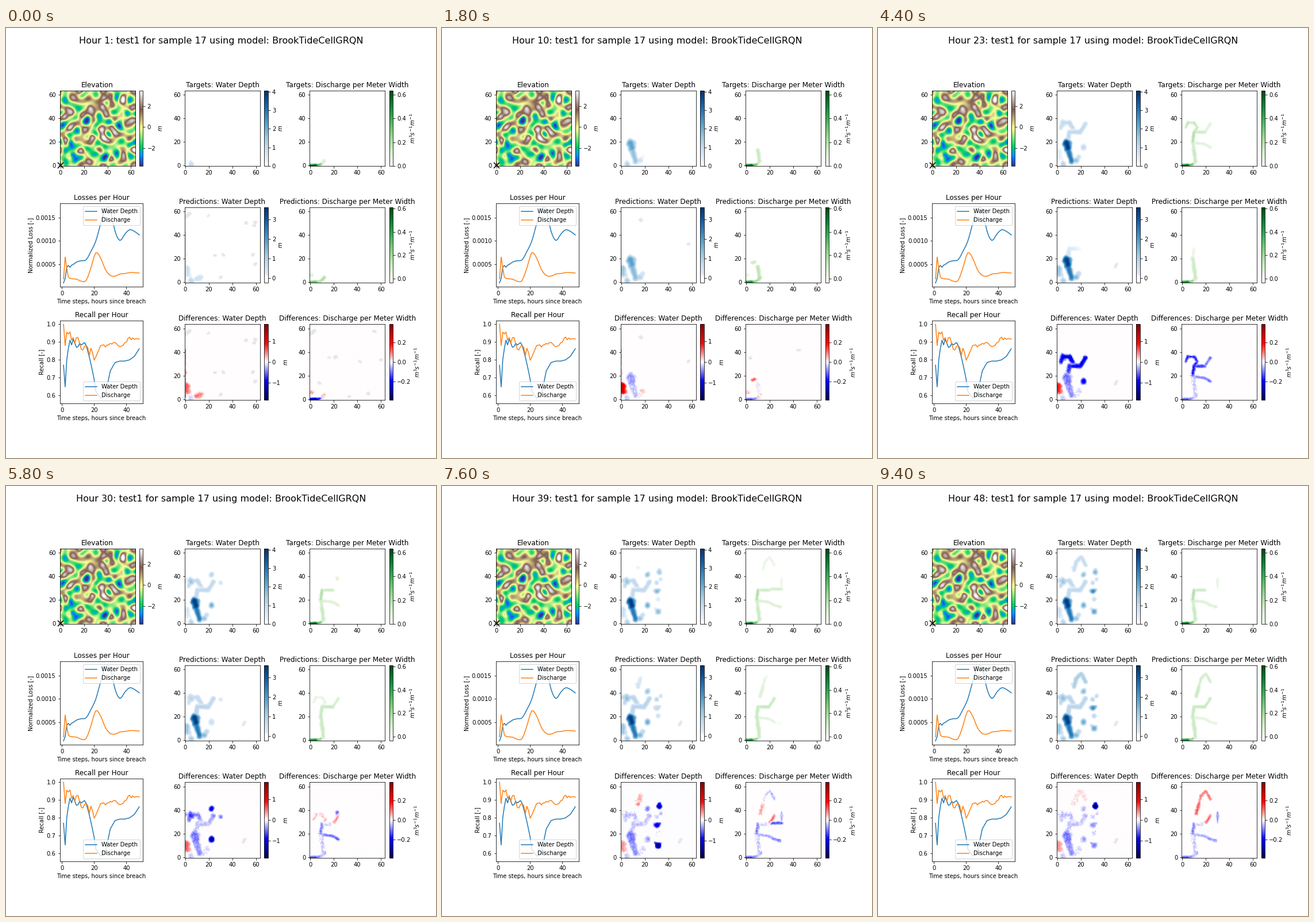
Write a matplotlib script that moves like this. It is 748 by 748 pixels and loops after 9600 ms.

```python
import numpy as np
import matplotlib.pyplot as plt
from matplotlib.animation import FuncAnimation
from matplotlib.colors import LinearSegmentedColormap, ListedColormap
from mpl_toolkits.axes_grid1 import make_axes_locatable

N, HOURS = 64, 48
DISCHARGE = "$m^3 s^{-1} m^{-1}$"
yy, xx = np.mgrid[0:N, 0:N].astype(float)

# Watercourses
LAKE = [(8, 19), (9, 15), (10, 9), (12, 4)]
STREAM = [(9, 20), (10, 28), (19, 28), (24, 35)]
ARC = [(13, 32), (10, 36), (5, 36), (3, 32)]
NORTH = [(14, 45), (16, 52), (20, 56), (24, 49)]
COLUMN = [(11, 3), (10, 13), (9, 20)]

# Pools: x, y, radius, depth, first hour, lag of the prediction
POOLS = [
    (18, 7, 2.8, 1.0, 9, -3), (5, 1, 3.0, 1.3, -6, 0), (5, 35, 3.6, 1.6, 20, 5),
    (1, 36, 2.6, 1.0, 26, 3), (22, 15, 3.2, 2.1, 19, 9), (22, 41, 2.8, 1.8, 24, 7),
    (30, 34, 2.2, 1.1, 24, 4), (33, 37, 2.0, 0.9, 31, 2), (30, 27, 3.2, 2.8, 33, 4),
    (31, 20, 2.2, 1.0, 35, -1), (31, 10, 3.3, 2.3, 32, 7), (32, 43, 2.9, 2.0, 32, 20),
    (14, 47, 2.4, 0.9, 37, -3),
]
HOLLOWS = [(3, 56), (42, 37), (51, 31), (47, 56), (58, 17), (48, 12), (40, 8), (56, 45)]
HILLS = [(36, 29), (37, 25), (24, 3), (4, 22), (17, 13), (9, 44), (3, 42), (27, 24),
         (25, 49), (37, 57), (36, 50), (54, 54), (59, 38), (45, 27), (53, 9), (16, 62)]


def smooth_noise(seed, k0, spread):
    """Band-limited random field with unit deviation."""
    freq = np.fft.fftfreq(N) * N
    k = np.hypot(freq[:, None], freq[None, :])
    white = np.random.default_rng(seed).normal(size=(N, N))
    field = np.fft.ifft2(np.fft.fft2(white) * np.exp(-((k - k0) / spread) ** 2)).real
    return field / field.std()


def terrain():
    """Random relief bent to pass through the known hills and hollows."""
    groups = [(LAKE, -3.0), ([p[:2] for p in POOLS], -2.0), (HOLLOWS, -2.6), (HILLS, 2.8)]
    px, py = np.vstack([pts for pts, _ in groups]).T
    height = np.concatenate([[z] * len(pts) for pts, z in groups])
    base = 1.25 * smooth_noise(17, 5.8, 2.2)

    def kernel(x, y):
        return np.exp(-((x[..., None] - px) ** 2 + (y[..., None] - py) ** 2) / 9)

    gap = height - base[py.astype(int), px.astype(int)]
    weights = np.linalg.solve(kernel(px, py) + 0.03 * np.eye(len(gap)), gap)
    return np.clip(base + kernel(xx, yy) @ weights, -3.73, 3.48)


WOBBLE = smooth_noise(3, 9, 4)
ROUGH = np.random.default_rng(8).normal(size=(N, N))


def stroke(pts, width):
    """Soft profile around a path, and how far along the path each cell lies."""
    pts = np.array(pts, float)
    if len(pts) == 1:
        pts = np.vstack([pts, pts])
    best = np.full((N, N), 99.0)
    along = np.zeros((N, N))
    for i, ((x0, y0), (x1, y1)) in enumerate(zip(pts[:-1], pts[1:])):
        dx, dy = x1 - x0, y1 - y0
        t = np.clip(((xx - x0) * dx + (yy - y0) * dy) / (dx * dx + dy * dy + 1e-9), 0, 1)
        dist = np.hypot(xx - x0 - t * dx, yy - y0 - t * dy)
        along = np.where(dist < best, (i + t) / (len(pts) - 1), along)
        best = np.minimum(best, dist)
    return np.clip(1 - (best * (1 + 0.12 * WOBBLE) / width) ** 2, 0, 1), along


def level(h, along, amount, start, ramp=5, front=0, end=99):
    """Rise from the start hour, delayed along the path, and fade after the end."""
    up = np.clip((h - start - front * along) / ramp, 0, 1) ** 0.7
    return amount * up * np.clip((end + 5 - h) / 5, 0, 1)


depth_bodies, flow_bodies = [], []


def depth(path, width, target=None, pred=None):
    depth_bodies.append((*stroke(path, width), target, pred))


def flow(path, width, target=None, pred=None):
    flow_bodies.append((*stroke(path, width), target, pred))


for x, y, radius, amount, start, lag in POOLS:
    depth([(x, y)], radius, (amount, start, 10), (0.85 * amount, start + lag, 10))
depth(LAKE[:2], 4.2, (4.0, 1, 20), (3.5, 1, 21))
depth(LAKE[1:], 3.3, (3.0, 1, 21), (2.6, 1, 21))
depth([(12, 4), (16, 4)], 2.8, (1.6, 4, 16), (1.5, 3, 15))
depth([(1, 12), (1, 7)], 3.2, (0.9, 13, 25), (1.3, -3, 12))
depth([(9, 3), (13, 4)], 2.6, None, (0.5, -9, 5, 0, 5))
depth([(0, 2), (0, 42)], 1.0, None, (0.45, -9, 5, 0, 7))
depth(STREAM, 2.3, (1.1, 12, 5, 7), (0.9, 20, 8, 4))
depth(ARC, 2.4, (1.1, 17, 5, 2), (0.9, 24, 8, 2))
depth(NORTH, 2.1, (1.0, 40, 5, 3), (1.1, 37, 6, 4))

SOURCE = [(0, 0), (5, 0)]
flow(SOURCE, 1.5, (0.62, -9), (0.50, -5, 11))
flow([(5, 0), (9, 1)], 1.4, (0.36, -9), (0.26, -5, 11))
flow([(9, 1), (12, 4)], 1.7, (0.12, -9), (0.18, -9, 5, 0, 20))
flow([(1, 6)], 2.2, None, (0.08, -9, 5, 0, 8))
flow(COLUMN[:2], 1.9, (0.16, 4), (0.15, 5, 4, 0, 10))
flow([(5, 16), (8, 17)], 1.4, None, (0.12, 6, 3, 0, 10))
flow(COLUMN, 1.9, (0.14, 10, 6, 3), (0.12, 16, 6, 2))
flow(STREAM[:2], 1.6, (0.22, 13, 6, 3), (0.13, 22, 7))
flow(STREAM[1:3], 1.5, (0.15, 17), (0.13, 24))
flow(STREAM[2:], 1.4, (0.10, 20, 3, 0, 25), (0.12, 27))
flow([STREAM[1]] + ARC, 1.4, (0.17, 18, 4, 1, 24), (0.04, 25, 5, 0, 33))
flow([(10, 19), (19, 18), (24, 15)], 1.4, (0.11, 19), (0.05, 31, 9))
flow([(23, 38)], 2, (0.11, 25, 4, 0, 30))
flow([(22, 16), (29, 14)], 1.3, (0.11, 33), (0.04, 38))
flow([(21, 29), (30, 29)], 1.4, (0.14, 33, 5, 0, 41))
flow([(30, 30), (30, 38)], 1.2, (0.08, 36))
flow([(12, 37)] + NORTH[:1], 1.8, None, (0.12, 34, 12))
flow(NORTH, 1.4, (0.08, 36, 5, 0, 43), (0.10, 36, 6, 5))


def fields(bodies, h, rough):
    target, pred = np.zeros((N, N)), np.zeros((N, N))
    for shape, along, t_rule, p_rule in bodies:
        if t_rule:
            target = np.maximum(target, shape * level(h, along, *t_rule))
        if p_rule:
            pred = np.maximum(pred, shape * level(h, along, *p_rule))
    wet = np.maximum(target, pred) > 0.2 * rough
    return target, pred, pred - target + wet * rough * ROUGH


def specks(h, seed):
    """Faint stray patches, many at first and fewer later."""
    rng = np.random.default_rng(100 * seed + h)
    out = np.zeros((N, N))

    def patch(path, width):
        return np.maximum(out, stroke(path, width)[0])

    for _ in range(int(round(9 * np.exp(-(h - 1) / 6)))):
        x, y = rng.uniform(2, 60, 2)
        out = patch([(x, y), (x + 1, y + rng.uniform(-1, 1))], rng.uniform(1.0, 1.7))
    if h == 1:
        out = patch([(0, 55), (4, 58)], 1.7)
    if h >= 14 and seed == 1:
        out = patch([(49, 13), (50, 15)], 1.4)
    return np.clip(out * 1.5, 0, 1)


def whiten(name, zero):
    """Sequential map that is pure white up to the zero value."""
    u = np.linspace(0, 1, 256)
    mix = np.clip((u - zero) / 0.05, 0, 1)[:, None]
    rgb = plt.get_cmap(name)(u)[:, :3]
    return ListedColormap(1 - mix * (1 - rgb))


hours = np.arange(1, HOURS + 1)


def curve(knots, values):
    """Cubic curve through the knots, read off at every hour."""
    knots, values = np.array(knots, float), np.array(values, float)
    slope = np.gradient(values, knots)
    i = np.clip(np.searchsorted(knots, hours, "right") - 1, 0, len(knots) - 2)
    step = knots[i + 1] - knots[i]
    t = (hours - knots[i]) / step
    ends = values[i] * (1 + 2 * t) * (1 - t) ** 2 + values[i + 1] * t * t * (3 - 2 * t)
    return ends + step * t * (1 - t) * (slope[i] * (1 - t) - slope[i + 1] * t)


side = 748 / 72 + 1e-6
fig, axes = plt.subplots(3, 3, figsize=(side, side), dpi=72)
fig.subplots_adjust(wspace=0.5)


def grid_map(ax, title, cmap, lo, hi, label, data=None):
    data = np.zeros((N, N)) if data is None else data
    im = ax.imshow(data, origin="lower", cmap=cmap, vmin=lo, vmax=hi)
    ax.set_title(title)
    cax = make_axes_locatable(ax).append_axes("right", size="5%", pad=0.1)
    fig.colorbar(im, cax=cax, label=label)
    return im


def line_plot(ax, title, ylabel, water, discharge, ylim, loc):
    ax.plot(hours, water, label="Water Depth")
    ax.plot(hours, discharge, label="Discharge")
    ax.set(title=title, xlabel="Time steps, hours since breach", ylabel=ylabel, ylim=ylim)
    ax.set_box_aspect(1)
    ax.legend(loc=loc)


grid_map(axes[0, 0], "Elevation", "terrain", -3.73, 3.48, "$m$", terrain())
axes[0, 0].plot(0, 0, "kx", ms=10, mew=1.5, clip_on=False)
axes[0, 0].set(xlim=(-0.5, N - 0.5), ylim=(-0.5, N - 0.5))

# Losses in units of 1e-4: hourly at first, then every third hour
loss_hours = np.r_[1:8, 9:49:3]
loss_depth = curve(loss_hours, [
    0.93, 1.9, 4.3, 4.7, 4.3, 4.75, 4.9, 5.4, 5.7, 5.9, 7.7, 9.9, 13.6, 16.8,
    16.5, 12, 10.05, 11.4, 12.35, 12.0, 11.25])
loss_flow = curve(loss_hours, [
    1.8, 6.5, 4.1, 2.2, 1.9, 1.85, 1.8, 1.75, 1.3, 1.45, 4.2, 7.4, 6.3, 3.8,
    2.55, 2.4, 2.85, 2.95, 3.15, 3.15, 3.05])
line_plot(axes[1, 0], "Losses per Hour", "Normalized Loss [-]",
          loss_depth * 1e-4, loss_flow * 1e-4, (0.00001, 0.0018), "upper right")

# Recall: hourly for the first part, then every third hour
recall_hours = np.r_[1:22, 24:49:3]
recall_depth = np.interp(hours, recall_hours, [
    .77, .648, .8, .864, .91, .884, .915, .893, .87, .874, .893, .883, .89, .897,
    .882, .85, .816, .777, .735, .69, .625, .585, .605, .738, .785, .793, .793,
    .80, .82, .862])
recall_flow = np.interp(hours, recall_hours, [
    1.0, .88, .955, .945, .956, .91, .925, .895, .925, .925, .89, .86, .855, .875,
    .88, .87, .825, .865, .84, .798, .815, .88, .88, .893, .898, .876, .895,
    .924, .92, .917])
jitter = np.random.default_rng(5).normal(0, 0.005, HOURS) * (hours > 24) * (hours < 46)
line_plot(axes[2, 0], "Recall per Hour", "Recall [-]",
          recall_depth, recall_flow + jitter, (0.554, 1.0215), "lower right")

images = [[], []]
for col, (kind, unit, cmap, t_max, p_min, p_max, span) in enumerate([
        ("Water Depth", "$m$", "Blues", 4.06, -0.25, 3.6, 1.81),
        ("Discharge per Meter Width", DISCHARGE, "Greens", 0.633, -0.037, 0.61, 0.382)]):
    zero = -p_min / (p_max - p_min)
    rows = [("Targets", whiten(cmap, 0), 0, t_max),
            ("Predictions", whiten(cmap, zero), p_min, p_max),
            ("Differences", "seismic", -span, span)]
    for row, (name, cm, lo, hi) in enumerate(rows):
        images[col].append(grid_map(axes[row, col + 1], f"{name}: {kind}", cm, lo, hi, unit))

grey = LinearSegmentedColormap.from_list("haze", [(.9, .9, .9, 0), (.9, .9, .9, 1)])


def haze(row, col):
    return axes[row, col].imshow(np.zeros((N, N)), origin="lower", cmap=grey, vmin=0, vmax=1)


depth_haze = [haze(1, 1), haze(2, 1)]
flow_haze = haze(2, 2)
heading = fig.suptitle("", fontsize=16)


def update(i):
    h = i + 1
    heading.set_text(f"Hour {h}: test1 for sample 17 using model: BrookTideCellGRQN")
    for group, bodies, rough in zip(images, (depth_bodies, flow_bodies), (0.07, 0.018)):
        for im, data in zip(group, fields(bodies, h, rough)):
            im.set_data(data)
    spots = specks(h, 1)
    for im in depth_haze:
        im.set_data(spots)
    flow_haze.set_data(specks(h, 2))


anim = FuncAnimation(fig, update, frames=HOURS, interval=200, repeat=True,
                     repeat_delay=0, init_func=lambda: update(0))
plt.show()
```
